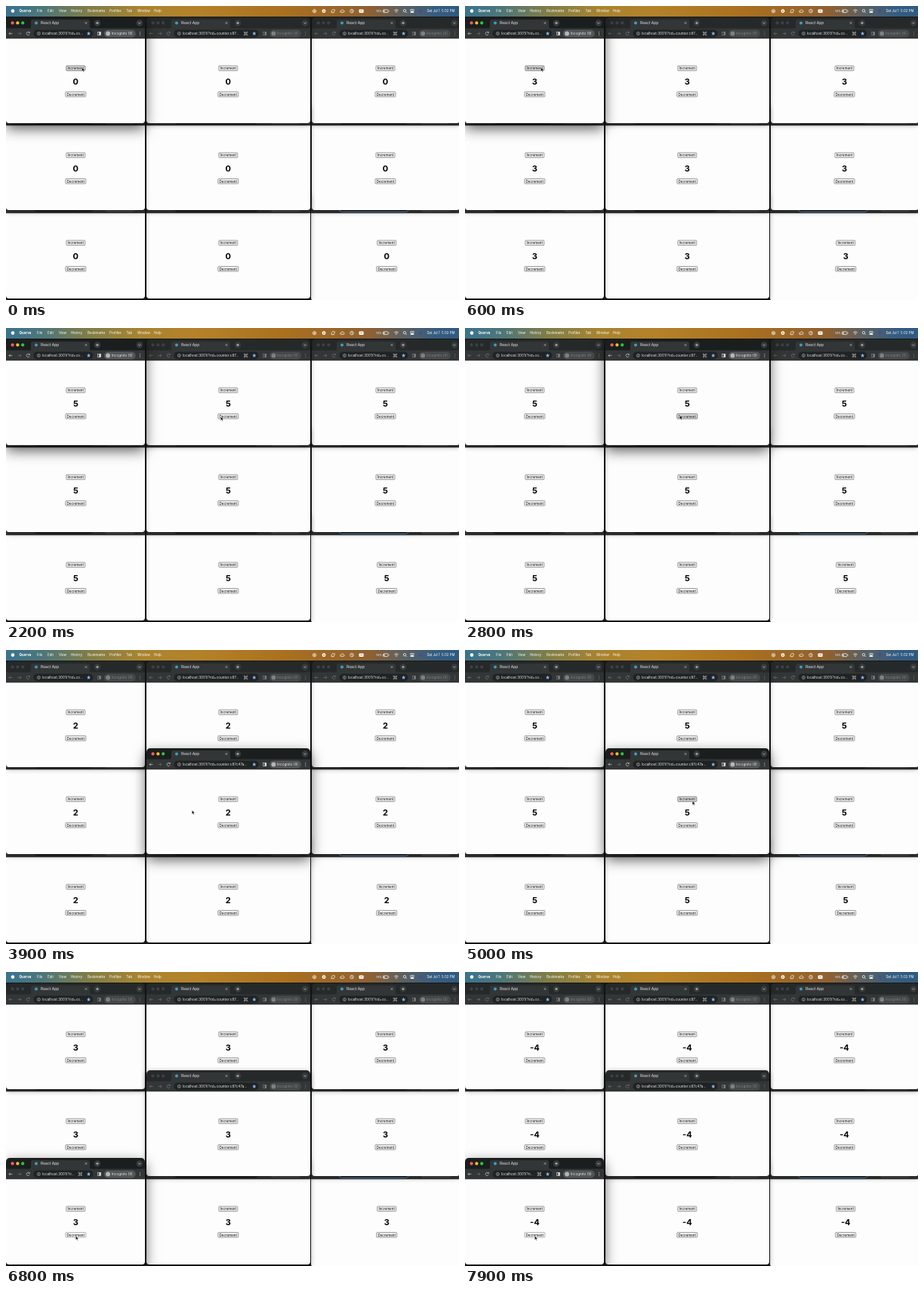
An HTML page that plays this animation: 600x389 px, repeating every 8000 ms.

```html
<!DOCTYPE html>
<html lang="en">
<head>
<meta charset="utf-8">
<title>Shared counter</title>
<style>
  html, body { margin: 0; width: 100%; height: 100%; overflow: hidden; background: #1b1c1d; }
  #stage { position: absolute; left: 0; top: 0; width: 600px; height: 389px; overflow: hidden; }
  svg { position: absolute; left: 0; top: 0; display: block; }
  text { font-family: Inter, Roboto, "Liberation Sans", sans-serif; white-space: pre; }

  #menu { z-index: 50; }
  #menu text { font-size: 4.4px; fill: #fff; }

  .win { position: absolute; border-radius: 5px 5px 4px 4px; box-shadow: 0 2px 7px rgba(0,0,0,.42); }
  .win svg { border-radius: inherit; overflow: hidden; }
  .win.on { box-shadow: 0 7px 18px rgba(0,0,0,.66); }
  .strip { fill: #262929; }
  .on .strip { fill: #1b1e1e; }
  .bar { fill: #333636; }
  .omni { fill: #202323; }
  .icon { fill: none; stroke: #77797b; stroke-width: .65; }
  .on .icon { stroke: #d4d5d6; }
  .dim { fill: #7e8082; }
  .on .dim { fill: #e2e3e4; }
  .on .badge { fill: #b4b6b8; }
  .pill { fill: #454848; stroke: #5c5f60; stroke-width: .4; }
  .on .pill { fill: #525556; stroke: #747778; }
  .light { fill: #3e4141; }
  .on .light { fill: var(--c); }
  .tabname { font-size: 5px; fill: #e6e7e8; }
  .url { font-size: 4.65px; fill: #e6e7e8; }
  .tag { font-size: 4.65px; }
  .page { fill: #fdfdfd; }
  .btn rect { fill: #f1f1f1; stroke: #6c6c6c; stroke-width: .65; }
  .btn text { font-size: 4.5px; fill: #000; }
  .btn.hover rect { fill: #dedede; stroke: #4c4c4c; }
  .btn.press rect { fill: #f4f4f4; stroke: #939393; }
  .count { font-size: 11px; font-weight: 700; fill: #000; }

  #cursor { z-index: 60; overflow: visible; }
</style>
</head>
<body>
<div id="stage">
  <svg id="menu" width="600" height="14"></svg>
  <svg id="cursor" width="8" height="10">
    <path d="M0 0V5.3L1.3 4.2 2.1 6.1 3 5.7 2.2 3.8H3.9Z" fill="#000" stroke="#fff" stroke-width=".5"/>
  </svg>
</div>
<script>
const LOOP = 8000;
const stage = document.getElementById('stage');
const cursor = document.getElementById('cursor');

const circle = (x, y, r, attrs) => `<circle cx="${x}" cy="${y}" r="${r}" ${attrs}/>`;
const rect = (x, y, w, h, attrs) => `<rect x="${x}" y="${y}" width="${w}" height="${h}" ${attrs}/>`;
const path = (d, attrs = 'class="icon"') => `<path d="${d}" ${attrs}/>`;
const text = (x, y, s, attrs = '') => `<text x="${x}" y="${y}" ${attrs}>${s}</text>`;

function star(x, y, r) {
  const points = Array.from({ length: 10 }, (_, i) => {
    const a = i * Math.PI / 5, d = i % 2 ? r * .45 : r;
    return `${(x + d * Math.sin(a)).toFixed(2)},${(y - d * Math.cos(a)).toFixed(2)}`;
  });
  return `<polygon points="${points.join(' ')}" fill="#8ab4f8"/>`;
}

// A small square with a loop on each corner.
function knot(x, y) {
  const line = 'fill="none" stroke="#c6c8ca" stroke-width=".55"';
  return rect(x - 1, y - 1, 2, 2, line) +
    [[-1, -1], [1, -1], [-1, 1], [1, 1]].map(([i, j]) => circle(x + i * 1.7, y + j * 1.7, .75, line)).join('');
}

function drawMenu() {
  const stops = [[0, '#3a7390'], [8, '#4d7679'], [18, '#7f7d48'], [30, '#a98430'], [42, '#b48229'],
                 [62, '#aa701f'], [80, '#8f6131'], [88, '#5a6062'], [95, '#355d82'], [100, '#2f5a80']];
  const items = [[41, 'File'], [55, 'Edit'], [70, 'View'], [86, 'History'], [108, 'Bookmarks'],
                 [137, 'Profiles'], [159.5, 'Tab'], [174, 'Window'], [196, 'Help']];
  const line = 'fill="none" stroke="#fff" stroke-width=".7"';
  const white = 'fill="#fff"';
  document.getElementById('menu').innerHTML =
    `<linearGradient id="sky">${stops.map(([o, c]) => `<stop offset="${o}%" stop-color="${c}"/>`).join('')}</linearGradient>` +
    rect(0, 0, 600, 14, 'fill="url(#sky)"') +
    circle(9, 6.6, 2.3, white) +
    text(17.5, 8.3, 'Quorva', 'font-weight="700"') +
    items.map(([x, s]) => text(x, 8.3, s)).join('') +
    circle(408.5, 6.7, 2.2, line) + circle(408.5, 6.7, 1, white) +
    circle(421, 6.7, 2.4, white) + rect(420.2, 5.9, 1.6, 1.6, 'fill="#a06c22"') +
    path('M431 8.6Q430.8 5.4 433 4.4L435.6 5.2 434.2 8.8Z', line) +
    path('M443 8.3Q442 6 444.3 5.8 446 3.6 447.6 6 449 8 447 8.3Z', line) +
    circle(458, 6.7, 2.3, line) + path('M458 5.2V6.8L459.2 7.5', line) +
    rect(467.6, 4.4, 6, 4.6, 'rx=".8" fill="#fff"') + path('M469 6.7H472.2', 'stroke="#876029" stroke-width=".7"') +
    text(490, 8.2, '14%', 'style="font-size:3.8px"') +
    rect(499.5, 4.9, 6.6, 3.7, `rx="1" ${line}`) + rect(500.3, 5.7, 1.3, 2.1, white) + rect(506.8, 6, .6, 1.4, white) +
    path('M514.3 5.8Q517 3.5 519.7 5.8M515.4 7.2Q517 5.8 518.6 7.2', line) + circle(517, 8.5, .6, white) +
    circle(528, 6.2, 1.7, line) + path('M529.3 7.5L530.8 9', line) +
    rect(535.5, 4.5, 5, 1.8, `rx=".9" ${line}`) + rect(535.5, 7.2, 5, 1.8, 'rx=".9" fill="#fff"') +
    circle(549.5, 6.7, 2.4, 'fill="#45518c"') +
    text(557.5, 8.3, 'Sat Jul 1&nbsp; 5:02 PM');
}

function button(cx, y, label, width) {
  return `<g class="btn">${rect(cx - width / 2, y - 3.2, width, 6.5, 'rx=".8"')}` +
    text(cx, y + 1.7, label, 'text-anchor="middle"') + '</g>';
}

function drawWindow({ w, h, cx, url, extra, focus }) {
  const R = n => w - n;
  const lights = ['#ff5f57', '#febc2e', '#28c840']
    .map((c, i) => circle(8.6 + i * 6.8, 7.4, 2.1, `class="light" style="--c:${c}"`)).join('');
  const px = R(61);
  return `<svg width="${w}" height="${h}">` +
    rect(0, 0, w, 15, 'class="strip"') + lights +
    path('M31 15Q33 15 33 12V5.5Q33 3 35.5 3H108.5Q111 3 111 5.5V12Q111 15 113 15Z', 'class="bar"') +
    circle(40, 7.5, 2, 'fill="#3d9dc2"') +
    text(46, 9.3, 'React App', 'class="tabname"') +
    path('M104.7 6.2L107.3 8.8M107.3 6.2L104.7 8.8', 'fill="none" stroke="#d0d1d2" stroke-width=".6"') +
    circle(121, 7.5, 4.2, 'fill="#383b3b"') +
    path('M119.2 7.5H122.8M121 5.7V9.3', 'fill="none" stroke="#e0e1e2" stroke-width=".7"') +
    circle(R(7.5), 7.5, 4.2, 'fill="#383b3b"') +
    path(`M${R(9)} 6.9L${R(7.5)} 8.3 ${R(6)} 6.9`, 'fill="none" stroke="#e0e1e2" stroke-width=".7"') +
    rect(0, 14.5, w, 14, 'class="bar"') +
    path('M8.5 21.4H4M5.8 19.6L4 21.4 5.8 23.2') +
    path('M15.5 21.4H20M18.2 19.6L20 21.4 18.2 23.2', 'fill="none" stroke="#77797b" stroke-width=".65"') +
    path('M31 20.2A2.1 2.1 0 1 0 31.2 22.2M31.3 18.8V20.5H29.6') +
    rect(36.5, 16.4, R(69) - 36.5, 10, `rx="5" class="omni" ${focus ? 'stroke="#6c9bdc" stroke-width=".9"' : ''}`) +
    circle(43.4, 21.4, 2, 'fill="none" stroke="#c6c8ca" stroke-width=".6"') +
    path('M43.4 21V22.6M43.4 20V20.5', 'stroke="#c6c8ca" stroke-width=".6"') +
    text(48, 23.1, url, 'class="url"') +
    (extra ? knot(R(86), 21.4) : '') +
    star(R(74.8), 21.4, 2.8) +
    rect(px - 2, 19.3, 4.2, 4.2, 'class="icon"') + rect(px, 19.3, 2.2, 4.2, 'class="dim"') +
    rect(R(54), 16.9, 41, 9.2, 'rx="4.6" class="pill"') +
    circle(R(49.2), 21.4, 2.9, 'class="dim badge"') +
    text(R(44.5), 23.1, 'Incognito (9)', 'class="tag dim"') +
    [19.6, 21.4, 23.2].map(y => circle(R(6.8), y, .5, 'class="dim"')).join('') +
    rect(0, 28.2, w, h, 'class="page"') +
    button(cx, 67.3, 'Increment', 25) +
    text(cx, 88.6, '0', 'class="count" text-anchor="middle"') +
    button(cx, 101.8, 'Decrement', 27) +
    '</svg>';
}

// Windows are numbered 0 to 8, row by row.
const cols = [{ x: 0, w: 184.3, cx: 92.3 }, { x: 185.8, w: 217.6, cx: 108.3 }, { x: 404.6, w: 196.4, cx: 97.5 }];
const rows = [{ y: 14.5, h: 140.5 }, { y: 129.5, h: 140.3 }, { y: 245.5, h: 141.8 }];
const host = 'localhost:3001/?r';
const special = {
  1: { url: host + 'id=counter:c87...', extra: true },
  2: { extra: true },
  4: { url: host + 'id=counter:c87c47a...' },
  6: { url: host + 'i...', extra: true },
  8: { x: 403.8, y: 246.2, w: 199, h: 144, cx: 100.2, focus: true }
};
const base = [8, 5, 2, 7, 6, 4, 3, 1, 0];

const windows = Array.from({ length: 9 }, (_, i) => {
  const spec = { url: host + 'id=co...', ...cols[i % 3], ...rows[Math.floor(i / 3)], ...special[i] };
  const el = document.createElement('div');
  el.className = 'win';
  el.style.cssText = `left:${spec.x}px;top:${spec.y}px;width:${spec.w}px;height:${spec.h}px`;
  el.innerHTML = drawWindow(spec);
  stage.append(el);
  return { el, count: el.querySelector('.count'), buttons: [...el.querySelectorAll('.btn')] };
});

// time, window brought to the front
const focusTimes = [[0, 0], [2500, 1], [3720, 4], [6100, 6]];

// Each run: window, button (0 up, 1 down), hover span, release times.
const runs = [
  { win: 0, btn: 0, from: 0, to: 1030, clicks: [180, 350, 520, 690, 860] },
  { win: 1, btn: 1, from: 2350, to: 3400, clicks: [2960, 3130, 3300] },
  { win: 4, btn: 0, from: 4360, to: 5280, clicks: [4560, 4740, 4920, 5140] },
  { win: 6, btn: 1, from: 5960, to: 8000, clicks: [6410, 6570, 6750, 6890, 7050, 7200, 7360, 7520, 7670, 7840, 8010] }
];
const PRESS = 120;

// time, x, y of the pointer tip
const track = [
  [0, 100.5, 81.3], [980, 100.5, 81.3], [1400, 257.4, 120.6], [1800, 284, 124], [2350, 284.5, 115.7],
  [3380, 284.5, 115.7], [3680, 250, 210], [3900, 246.3, 212], [4050, 248, 212], [4380, 301.2, 199.8],
  [5250, 301.2, 199.8], [5950, 92.3, 349.2], [8000, 92.3, 349.2]
];

function pointer(t) {
  const i = track.findIndex((p, n) => n && t <= p[0]);
  const [t0, x0, y0] = track[i - 1], [t1, x1, y1] = track[i];
  const u = (t - t0) / (t1 - t0), e = u * u * (3 - 2 * u);
  return [x0 + (x1 - x0) * e, y0 + (y1 - y0) * e];
}

function draw(t) {
  const value = runs.reduce((sum, r) =>
    sum + r.clicks.filter(c => c <= t).length * (r.btn ? -1 : 1), 0);
  const raised = focusTimes.filter(f => f[0] <= t).map(f => f[1]);
  const active = raised[raised.length - 1];
  const order = base.filter(i => !raised.includes(i)).concat(raised);
  const run = runs.find(r => t >= r.from && t < r.to);
  const pressed = run && run.btn && run.clicks.some(c => t >= c - PRESS && t < c);

  windows.forEach(({ el, count, buttons }, i) => {
    el.style.zIndex = order.indexOf(i) + 1;
    el.classList.toggle('on', i === active);
    count.textContent = value;
    buttons.forEach((b, k) => {
      const hit = !!run && run.win === i && run.btn === k;
      b.classList.toggle('hover', hit);
      b.classList.toggle('press', hit && !!pressed);
    });
  });
  const [x, y] = pointer(t);
  cursor.style.transform = `translate(${x}px, ${y}px)`;
}

function tick() {
  draw(performance.now() % LOOP);
  requestAnimationFrame(tick);
}

drawMenu();
tick();
</script>
</body>
</html>
```
